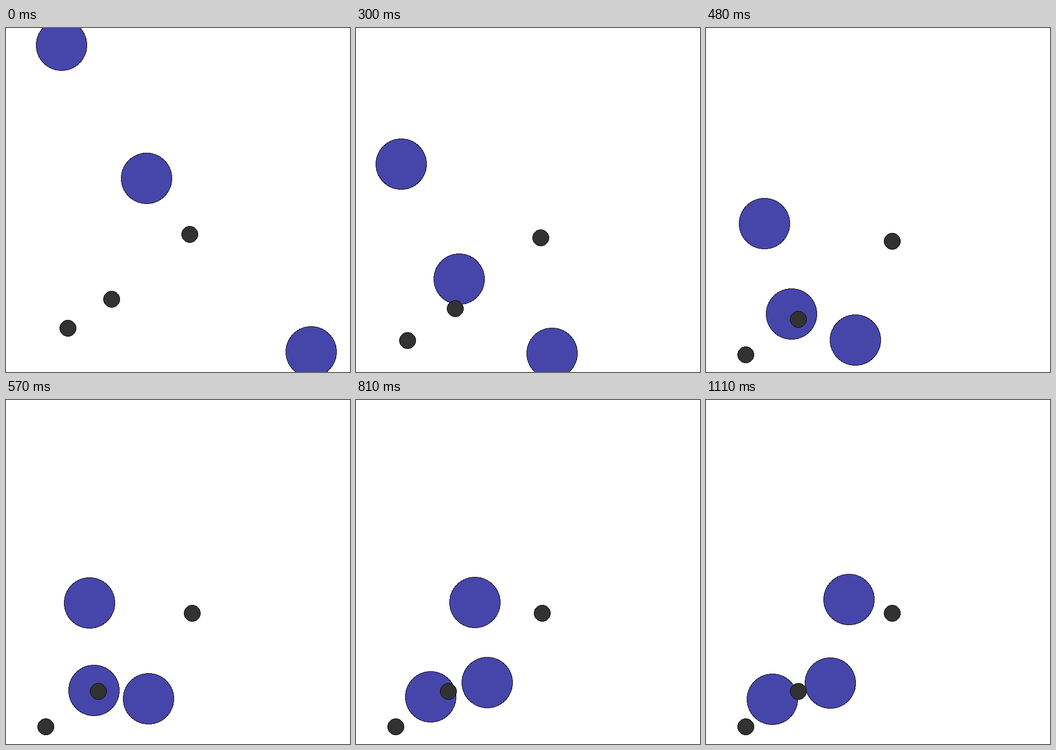
Write an HTML page that moves like this. It is 700x700 px and loops after 1.17 s.

```html
<!DOCTYPE html>
<html>
<head>
<meta charset="utf-8">
<style>
html, body { margin: 0; width: 100%; height: 100%; overflow: hidden; background: #fff; }
svg { display: block; }
circle { stroke: #000; shape-rendering: crispEdges; }
.hunter { fill: #4646aa; r: 51.5px; }
.prey { fill: #323232; r: 16.5px; }
</style>
</head>
<body>
<svg id="stage" width="700" height="700"></svg>
<script>
const LOOP = 1170;
const CATCH = 8; // step at which the prey stop
const KEYS = [0, 3, CATCH, 12, 17, 21, 24]; // steps shared by all hunters

// Monotone tangent: at rest at both ends and at turning points.
function slope(values, i) {
  if (i === 0 || i === KEYS.length - 1) return 0;
  const rate = k => (values[k + 1] - values[k]) / (KEYS[k + 1] - KEYS[k]);
  const before = rate(i - 1), after = rate(i);
  return before * after <= 0 ? 0 : 2 * before * after / (before + after);
}

// Smooth curve through the key values.
function glide(...values) {
  return step => {
    const next = KEYS.findIndex(k => k > step);
    if (next < 0) return values.at(-1);
    const i = next - 1, h = KEYS[next] - KEYS[i];
    const u = (step - KEYS[i]) / h, v = 1 - u;
    return v * v * (1 + 2 * u) * values[i] + u * u * (1 + 2 * v) * values[next]
      + h * u * v * (v * slope(values, i) - u * slope(values, next));
  };
}

// Speeds up from rest, then stops dead.
function flee(from, to) {
  return step => from + (to - from) * Math.min(1, step / CATCH) ** 2.65;
}

function disc(kind, x, y) {
  const el = document.createElementNS('http://www.w3.org/2000/svg', 'circle');
  el.setAttribute('class', kind);
  document.getElementById('stage').append(el);
  return step => {
    el.setAttribute('cx', Math.round(x(step)));
    el.setAttribute('cy', Math.round(y(step)));
  };
}

const discs = [
  disc('hunter', glide(113, 109, 85, 170, 242, 281, 291), glide(35, 113, 363, 413, 412, 399, 406)),
  disc('hunter', glide(286, 285, 169, 179, 152, 125, 135), glide(306, 389, 566, 591, 604, 609, 609)),
  disc('hunter', glide(621, 542, 328, 290, 267, 253, 253), glide(659, 665, 657, 608, 575, 590, 576)),
  disc('prey', flee(374, 379), flee(420, 434)),
  disc('prey', flee(215, 188), flee(552, 593)),
  disc('prey', flee(126, 81), flee(611, 665)),
];

// Steps come 45 ms apart, snapped down to a 30 ms grid, after a 90 ms hold.
function stepAt(t) {
  return t < 90 ? 0 : 2 * Math.floor(t / 90) - 1 + (t % 90 >= 30 ? 1 : 0);
}

const start = performance.now();
function frame() {
  const step = stepAt((performance.now() - start) % LOOP);
  discs.forEach(place => place(step));
  requestAnimationFrame(frame);
}
frame();
</script>
</body>
</html>
```
